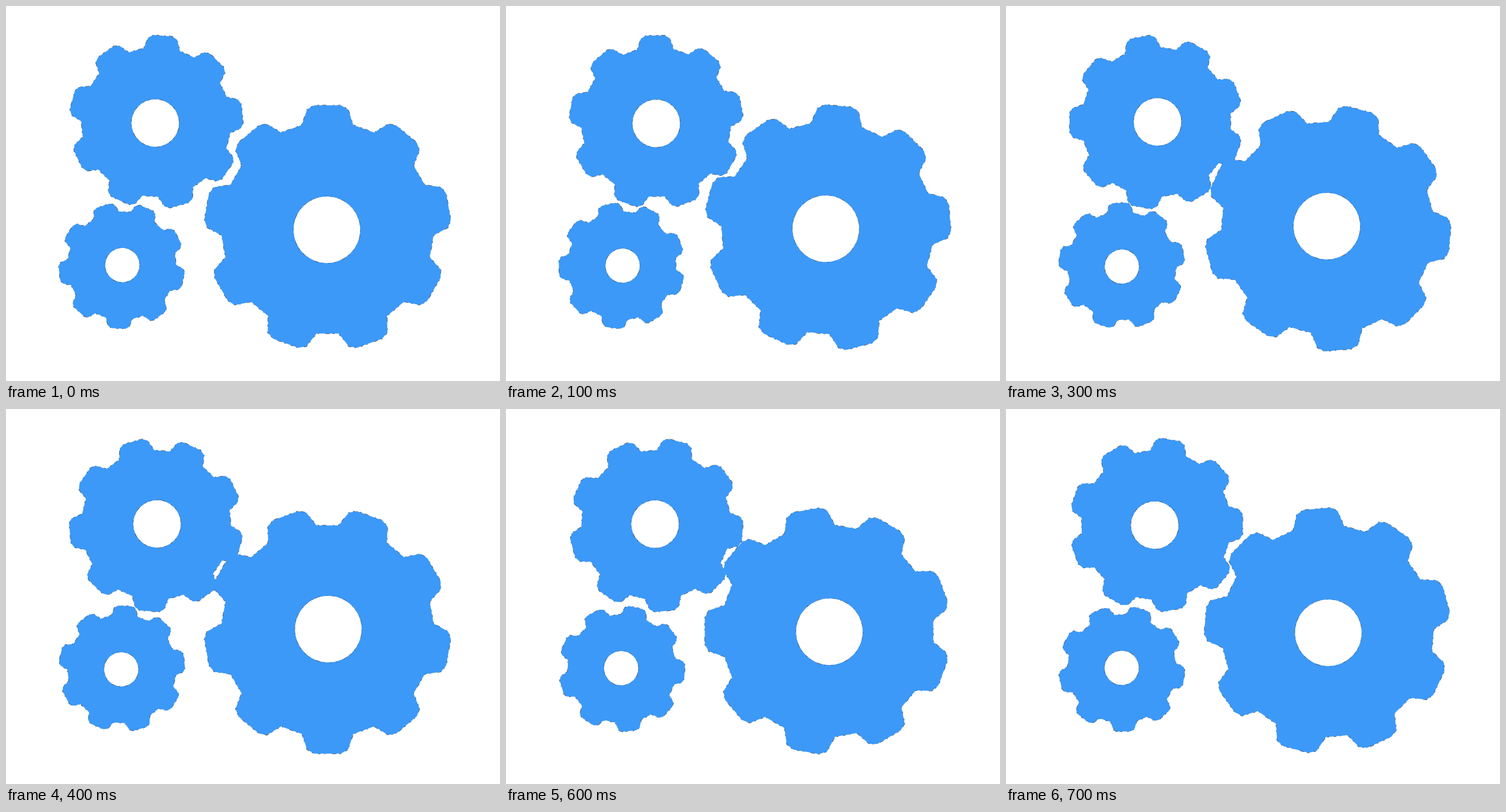
Write an HTML page that moves like this. It is 816 px wide and 620 px high and loops after 800 ms.

```html
<!DOCTYPE html>
<html lang="en">
<head>
<meta charset="utf-8">
<title>Turning gears</title>
<style>
  html, body { margin: 0; width: 100%; height: 100%; overflow: hidden; background: #fff; }
  svg { display: block; width: 816px; height: 620px; }
  .wheel { fill: #3c99f8; }
  .hole { fill: #fff; }
  .rim { fill: none; stroke: #4a4a4a; stroke-width: 1.4; stroke-dasharray: 3 5 7 11 2 6 4 8; }
</style>
</head>
<body>
<svg id="stage" viewBox="0 0 816 620"></svg>
<script>
const STEP = 100, STEPS = 8, TEETH = 9, PITCH = 360 / TEETH;

// Half a tooth from valley to tip: degrees off its middle, radius on the large wheel
const HALF_TOOTH = [[14, 175.5], [9.8, 199], [6.2, 204]];
const TOOTH = [
  ...HALF_TOOTH.map(([deg, r]) => [-deg, r]),
  ...[...HALF_TOOTH].reverse()
];

// start: first tooth's angle from the top; each hole circles its axle at distance sway from phase
const GEARS = [
  { x: 248, y: 191.8, size: 0.705, start: 4.5, dir: -1, hole: 39.3, sway: 2.3, phase: 130 },
  { x: 191.3, y: 429.4, size: 0.512, start: -17, dir: 1, hole: 28.3, sway: 1.4, phase: 310 },
  { x: 531.2, y: 367, size: 1, start: 0, dir: 1, hole: 55, sway: 3.2, phase: 112 }
];

const stage = document.getElementById('stage');

function add(tag, attrs) {
  const el = document.createElementNS('http://www.w3.org/2000/svg', tag);
  for (const key in attrs) el.setAttribute(key, attrs[key]);
  return stage.appendChild(el);
}

// Point at an angle measured clockwise from the right
function polar(deg, r) {
  const a = deg * Math.PI / 180;
  return [r * Math.cos(a), r * Math.sin(a)];
}

function outline(size) {
  const points = [];
  for (let i = 0; i < TEETH; i++) {
    for (const [deg, r] of TOOTH) {
      points.push(polar(deg + i * PITCH - 90, r * size).map(v => v.toFixed(2)));
    }
  }
  return 'M' + points.join('L') + 'Z';
}

// Rims first, so the wheels cover their inner half
for (const g of GEARS) g.rim = add('path', { class: 'rim', d: outline(g.size) });
for (const g of GEARS) g.wheel = add('path', { class: 'wheel', d: outline(g.size) });
for (const g of GEARS) {
  g.holes = ['rim', 'hole'].map(name => add('circle', { class: name, r: g.hole }));
}

function draw(step) {
  const part = step / STEPS;
  for (const g of GEARS) {
    const turn = g.start + g.dir * PITCH * part;
    for (const el of [g.rim, g.wheel]) {
      el.setAttribute('transform', `translate(${g.x} ${g.y}) rotate(${turn})`);
    }
    const [dx, dy] = polar(g.phase + g.dir * 360 * part, g.sway);
    for (const el of g.holes) {
      el.setAttribute('transform', `translate(${g.x + dx} ${g.y + dy})`);
    }
  }
}

const begin = performance.now();
function tick(now) {
  draw(Math.floor(Math.max(0, now - begin) / STEP) % STEPS);
  requestAnimationFrame(tick);
}
draw(0);
requestAnimationFrame(tick);
</script>
</body>
</html>
```
